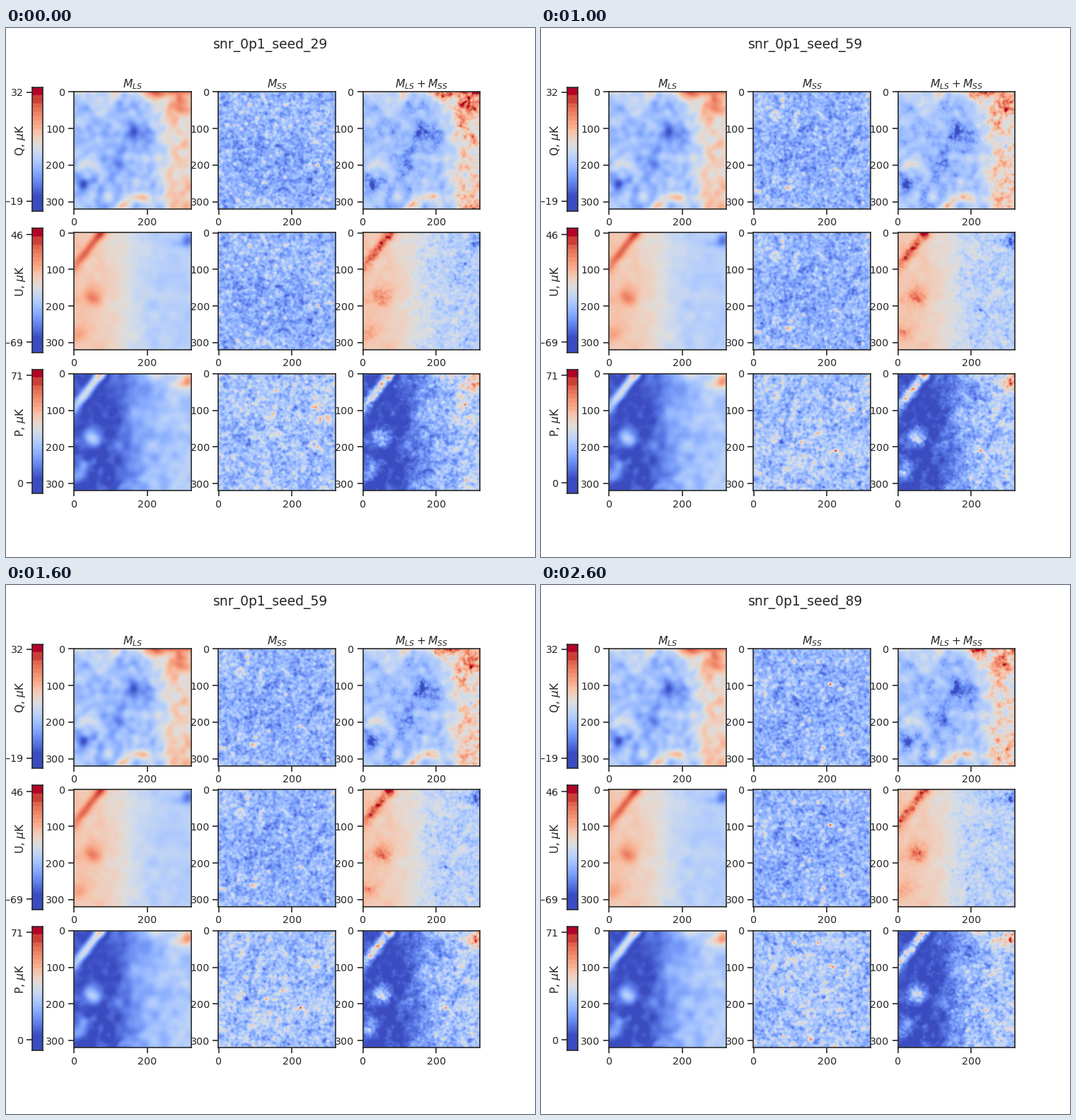
Animation of 748 by 748 pixels, one loop 3 s. Source, as a matplotlib script:

```python
import numpy as np
import matplotlib.pyplot as plt
from matplotlib.animation import FuncAnimation

SIZE, DPI, N = 748, 93.5, 320
INK = "#262626"
CMAP = "coolwarm"
LEFT, TOP, SIDE = 96, 90, 165.8
STEP_X, STEP_Y = 204.3, 199.3
BAR_H = 175.3
SEEDS = (29, 59, 89)

plt.rcParams.update({
    "font.family": "DejaVu Sans", "font.size": 12,
    "text.color": INK, "axes.labelcolor": INK, "axes.edgecolor": INK,
    "xtick.color": INK, "ytick.color": INK,
    "axes.linewidth": 1.25, "axes.titlesize": 12,
    "xtick.labelsize": 11, "ytick.labelsize": 11,
    "xtick.major.size": 6, "ytick.major.size": 6,
    "xtick.major.width": 1.25, "ytick.major.width": 1.25,
})

Y, X = np.mgrid[0:N, 0:N].astype(float)


def sigmoid(v):
    return 1 / (1 + np.exp(-v))


def bump(x, y, radius, aspect=1.0):
    """Gaussian of unit height, stretched along x by aspect."""
    return np.exp(-(((X - x) / aspect) ** 2 + (Y - y) ** 2) / (2 * radius ** 2))


def random_field(seed, beam, slope=0.0):
    """Unit-variance Gaussian random field with a power-law spectrum."""
    rng = np.random.default_rng(seed)
    k = np.hypot(np.fft.fftfreq(N)[:, None], np.fft.rfftfreq(N)[None, :])
    k[0, 0] = 1
    gain = k ** -slope * np.exp(-2 * (np.pi * beam * k) ** 2)
    gain[0, 0] = 0
    f = np.fft.irfft2(np.fft.rfft2(rng.normal(size=(N, N))) * gain, s=(N, N))
    return f / f.std()


def skewed(field):
    return field + 0.3 * np.maximum(field - 0.8, 0) ** 2


# The colour scale is flat at the bottom and linear above
def shade(t):
    return np.where(t < 0.66, np.maximum(t - 0.12, 0) * 1.22, t)


def unshade(level):
    return np.where(level < 0.66, level / 1.22 + 0.12, level)


def large_q():
    """Cold centre, warm right side and top edge."""
    level = 0.32 + 0.25 * sigmoid((X - 245) / 12) + 0.2 * np.exp(-Y / 9)
    level += 0.05 * random_field(4, 8)
    level += 0.40 * bump(225, 2, 13, 1.6) + 0.22 * bump(275, 45, 27)
    level -= 0.22 * bump(162, 115, 17, 1.6) + 0.21 * bump(112, 195, 22)
    level -= 0.16 * bump(25, 250, 18)
    level += 0.22 * bump(30, 205, 15) + 0.28 * bump(185, 288, 9, 2.2)
    level += 0.36 * bump(133, 308, 11) + 0.13 * bump(290, 300, 18)
    return 58 * unshade(level) - 23.6


def large_u():
    """Warm left side with a bright filament and a hot spot."""
    level = 0.62 - 0.25 * sigmoid((X - 140) / 33) + 0.017 * random_field(8, 9)
    across = (X - 74 + 0.76 * Y) * 0.79
    fade = 0.34 - 0.2 * np.clip(Y / 100, 0, 1.5)
    level += fade * np.exp(-(across / 9) ** 2 / 2)
    level += 0.19 * bump(50, 175, 18) + 0.11 * bump(10, 275, 18)
    level -= 0.25 * bump(312, 18, 13) + 0.10 * bump(285, 30, 9, 2.6)
    return 133 * unshade(level) - 80


def levels(q, u):
    return [shade(t) for t in
            ((q + 23.6) / 58, (u + 80) / 133, (np.hypot(q, u) + 6.8) / 82)]


Q, U = large_q(), large_u()
LARGE = levels(Q, U)
CENTRE = bump(150, 180, 70)


def bright_points(seed, count=12):
    rng = np.random.default_rng(seed)
    return sum(rng.uniform(0.2, 0.55) * bump(*rng.uniform(5, N - 5, 2), 3)
               for _ in range(count))


def realise(seed):
    """Small-scale and combined levels, each for Q, U and P."""
    a = random_field(seed, 2.4, 0.3)
    b = random_field(seed + 1, 2.4, 0.4)
    peaks = bright_points(seed)
    small = 0.28 + 0.065 * skewed(a) - 0.05 * CENTRE + peaks
    small_p = 0.32 + 0.075 * skewed(0.6 * a + 0.8 * b) + 0.7 * peaks
    total = levels(Q * (1 + 0.26 * skewed(b)), U * (1 + 0.22 * skewed(a)))
    return (small, small, small_p), total


SCENES = [realise(s) for s in SEEDS]

fig = plt.figure(figsize=(SIZE / DPI, SIZE / DPI), dpi=DPI, facecolor="white")
heading = fig.suptitle("", y=0.981)


def add_axes(x, y, w, h):
    return fig.add_axes([x / SIZE, 1 - (y + h) / SIZE, w / SIZE, h / SIZE])


def add_bar(top, name, high, low):
    """Colour bar whose two ticks are (pixels below its top, value)."""
    ax = add_axes(37, top, 15, BAR_H)
    t = (np.arange(700) + 0.5) / 700
    # Coarse steps towards the top
    step = np.where(t > 0.865, 0.0675, 0.03375)
    stepped = 1 - np.floor((1 - t) / step) * step
    level = np.where(t > 0.66, stepped, shade(t))
    ax.imshow(level[:, None], origin="lower", aspect="auto", cmap=CMAP,
              vmin=0, vmax=1, extent=(0, 1, 0, BAR_H))
    ax.set_xticks([])
    ax.set_yticks([BAR_H - y for y, _ in (high, low)],
                  [f"{v}".replace("-", "\u2212") for _, v in (high, low)])
    fig.text(20 / SIZE, 1 - (top + 75) / SIZE, name + r", $\mu$K",
             rotation=90, ha="center", va="center")


def add_panel(row, col):
    ax = add_axes(LEFT + col * STEP_X, TOP + row * STEP_Y, SIDE, SIDE)
    ax.set_xticks([0, 200])
    ax.set_yticks([0, 100, 200, 300])
    if row == 0:
        ax.set_title(TITLES[col], pad=4.6)
    image = ax.imshow(LARGE[row], cmap=CMAP, vmin=0, vmax=1)
    return image


BARS = (("Q", (7, 32), (161, -19)),
        ("U", (8.7, 46), (160.7, -69)),
        ("P", (8.8, 71), (160.6, 0)))
TITLES = ("$M_{LS}$", "$M_{SS}$", "$M_{LS} + M_{SS}$")

for row, bar in enumerate(BARS):
    add_bar(84 + row * STEP_Y, *bar)
images = [[add_panel(row, col) for col in range(3)] for row in range(3)]


def draw(i):
    heading.set_text(f"snr_0p1_seed_{SEEDS[i]}")
    for col, maps in enumerate(SCENES[i], start=1):
        for row in range(3):
            images[row][col].set_data(maps[row])
    return [heading]


anim = FuncAnimation(fig, draw, frames=len(SEEDS), interval=1000, repeat=True)
plt.show()
```
